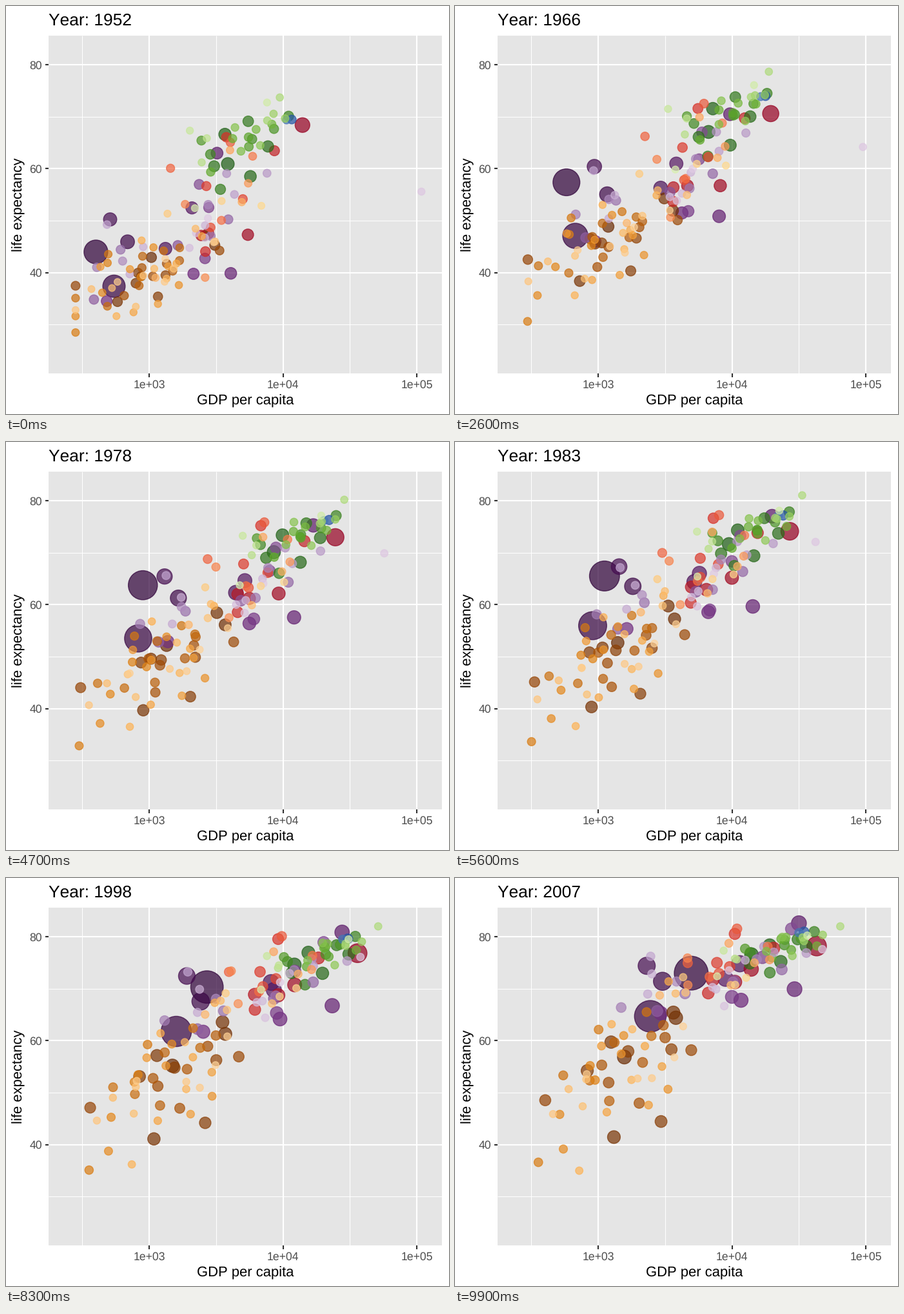
A matplotlib script for the animation above (10 s loop, 687 by 633 pixels).

```python
import numpy as np
import matplotlib.pyplot as plt
from matplotlib.animation import FuncAnimation
from matplotlib.colors import LinearSegmentedColormap
from matplotlib.patches import Rectangle

W, H, DPI = 687, 633, 64
PT = 72 / DPI  # points per pixel
FRAMES, INTERVAL = 100, 100
FIRST, LAST = 1952, 2007
LEFT, TOP, RIGHT, BOTTOM = 66, 46, 676, 570

KEYS = np.linspace(0, 1, 12)  # one key every five years
GROWTH = KEYS ** .7           # fast progress early, slower later
ALPHA = .7
rng = np.random.default_rng(11)

plt.rcParams.update({
    "font.family": ["Liberation Sans", "DejaVu Sans"],
    "text.hinting": "none",
    "text.kerning_factor": 6,
})


def px(log_gdp):
    return 222 + 207.5 * (np.asarray(log_gdp) - 3)


def py(life):
    return 413.8 - 8.066 * (np.asarray(life) - 40)


def mix(a, b, t):
    return a + (b - a) * t


def route(points):
    """Sample evenly spaced points at the keys."""
    return np.interp(KEYS, np.linspace(0, 1, len(points)), points)


# The few outliers: continent, final millions, GDP and life expectancy on the way
LANDMARKS = [
    ("Asia", 1319, (400, 640, 1420, 4959), (44, 61, 67.5, 73)),
    ("Asia", 1110, (546, 715, 1010, 2452), (37.4, 49.7, 58.7, 64.7)),
    ("Asia", 127, (3217, 13000, 24000, 31656), (63, 72.5, 79, 82.6)),
    ("Asia", 2.5, (108382, 92000, 30000, 47307), (55.6, 66.5, 74.5, 77.6)),
    ("Americas", 301, (13990, 21300, 30000, 42950), (68.4, 71.2, 75.4, 78.2)),
]

# Each continent as a drifting cloud; pairs run from the first to the last year
CONTINENTS = {
    "Africa": dict(
        n=52, largest=95, decay=10, share=.27, gdp=(2.98, 3.2), gdp_sd=.33,
        life=(39.2, 54.5), life_sd=(5, 8),
        ramp=("#6b2c04", "#a85006", "#e08214", "#fdb050", "#fed39a")),
    "Asia": dict(
        n=33, largest=240, decay=6, share=.4, gdp=(3.15, 3.85), gdp_sd=.4,
        life=(46.5, 71.5), life_sd=(8.5, 6),
        ramp=("#2e0038", "#6a2378", "#9970ab", "#c2a5cf", "#e0cbe3")),
    "Americas": dict(
        n=25, largest=110, decay=5, share=.4, gdp=(3.48, 3.9), gdp_sd=.23,
        life=(53, 73.6), life_sd=(8, 3.6),
        ramp=("#960020", "#d73027", "#f46d43", "#fdae61", "#fed98e")),
    "Europe": dict(
        n=30, largest=90, decay=6, share=.78, gdp=(3.72, 4.37), gdp_sd=.22,
        life=(64.8, 77.6), life_sd=(5.5, 2.8),
        ramp=("#1c5c14", "#3c8420", "#66ad2f", "#9bd062", "#d9f0b0")),
    "Oceania": dict(
        n=2, largest=20, decay=1, share=.47, gdp=(4.01, 4.48), gdp_sd=.03,
        life=(69.2, 80.7), life_sd=(.3, .5),
        ramp=("#2554a4", "#4575b4")),
}


def drift(base):
    """Standard scores that stay near a country's own level over time."""
    change = rng.normal(0, .35, (len(base), 1))
    wobble = rng.normal(0, .05, (len(base), len(KEYS)))
    return base[:, None] + change * (KEYS - .5) + wobble


def crowd(n, c):
    """Population, log GDP and life expectancy of n random countries."""
    wealth, luck = np.clip(rng.normal(size=(2, n)), -1.9, 1.9)
    health = .65 * wealth + .75 * luck
    gdp = mix(*c["gdp"], GROWTH) + c["gdp_sd"] * drift(wealth)
    life = mix(*c["life"], GROWTH) + mix(*c["life_sd"], KEYS) * drift(health)
    pop = c["largest"] * np.exp(-np.arange(n) / c["decay"])
    return list(zip(pop, np.maximum(gdp, 2.45), np.clip(life, 28.5, 82)))


dots = []
for name, c in CONTINENTS.items():
    group = [(pop, route(np.log10(gdp)), route(life))
             for where, pop, gdp, life in LANDMARKS if where == name]
    group += crowd(c["n"] - len(group), c)
    group.sort(key=lambda d: -d[0])
    ramp = LinearSegmentedColormap.from_list(name, c["ramp"])
    for rank, (pop, gdp, life) in enumerate(group):
        color = ramp(rank / (len(group) - 1), alpha=ALPHA)
        dots.append((pop * mix(c["share"], 1, KEYS), px(gdp), py(life), color))
dots.sort(key=lambda d: -d[0][-1])  # small dots on top

people, xs, ys = (np.array([d[k] for d in dots]) for k in range(3))
colors = [d[3] for d in dots]

fig = plt.figure(figsize=(W / DPI, H / DPI), dpi=DPI, facecolor="white")
ax = fig.add_axes((0, 0, 1, 1))
ax.set(xlim=(0, W), ylim=(H, 0))
ax.axis("off")

panel = Rectangle((LEFT, TOP), RIGHT - LEFT, BOTTOM - TOP, fc="#e5e5e5", lw=0, zorder=0)
ax.add_patch(panel)


def line(x, y, color="white", width=2.13):
    ax.plot(x, y, color=color, lw=width * PT, solid_capstyle="butt", zorder=1)


def label(x, y, text, size, color="black", **kw):
    return ax.text(x, y, text, fontsize=size * PT, color=color, **kw)


for g in (2.5, 3.5, 4.5):
    line([px(g)] * 2, (TOP, BOTTOM), width=1.07)
for l in (30, 50, 70):
    line((LEFT, RIGHT), [py(l)] * 2, width=1.07)
for g in (3, 4, 5):
    line([px(g)] * 2, (TOP, BOTTOM))
    line([px(g)] * 2, (BOTTOM, BOTTOM + 5.5), "#333333")
    label(px(g), 593, f"1e+0{g}", 17.6, "#4d4d4d", ha="center")
for l in (40, 60, 80):
    line((LEFT, RIGHT), [py(l)] * 2)
    line((LEFT - 5.5, LEFT), [py(l)] * 2, "#333333")
    label(56, py(l) + 6.3, str(l), 17.6, "#4d4d4d", ha="right")

label(371, 618, "GDP per capita", 22, ha="center")
label(19.5, 308, "life expectancy", 22, ha="center", va="center", rotation=90)
title = label(66, 30, "", 26.4)

cloud = ax.scatter(xs[:, 0], ys[:, 0], c=colors, edgecolors=colors,
                   linewidths=1.42 * PT, zorder=2)
cloud.set_clip_path(panel)


def at(table, t):
    """Linear blend between neighbouring five-year keys."""
    pos = t * (len(KEYS) - 1)
    k = min(int(pos), len(KEYS) - 2)
    return mix(table[:, k], table[:, k + 1], pos - k)


def draw(i):
    t = i / (FRAMES - 1)
    radius = 4.97 + 21.3 * np.sqrt(at(people, t) / people.max())
    cloud.set_offsets(np.column_stack((at(xs, t), at(ys, t))))
    cloud.set_sizes((2 * radius * PT) ** 2)
    title.set_text(f"Year: {round(mix(FIRST, LAST, t))}")
    return cloud, title


anim = FuncAnimation(fig, draw, frames=FRAMES, interval=INTERVAL,
                     init_func=lambda: draw(0), repeat=True, repeat_delay=0)
plt.show()
```
